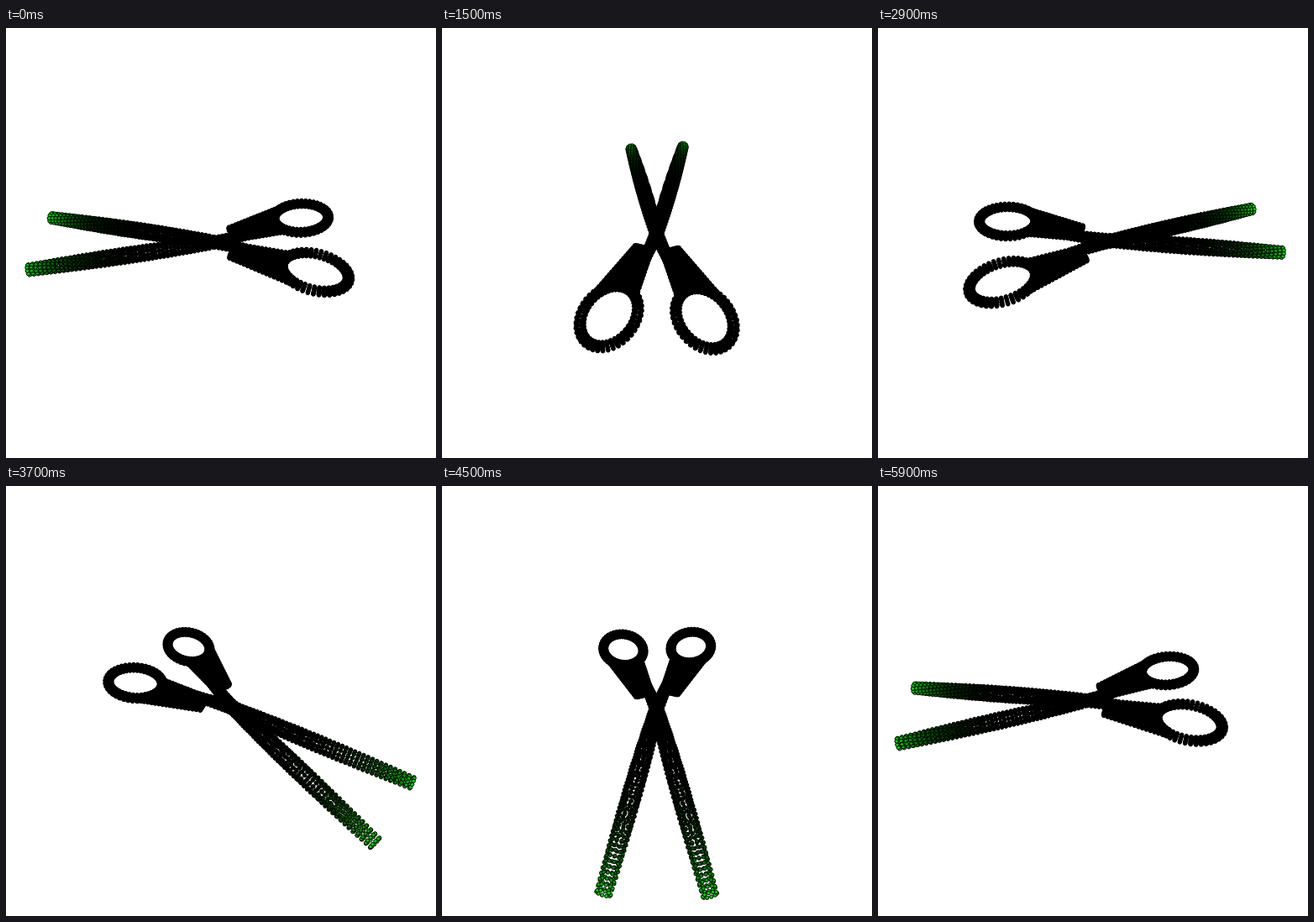
An HTML page with a canvas for the animation above (6000 ms loop, 512x512 px).

```html
<!DOCTYPE html>
<html lang="en">
<head>
<meta charset="utf-8">
<title>Turning scissors</title>
<style>
  html, body { margin: 0; width: 100%; height: 100%; overflow: hidden; background: #fff; }
  canvas { display: block; width: 512px; height: 512px; }
</style>
</head>
<body>
<canvas id="stage" width="512" height="512"></canvas>
<script>
const ctx = document.getElementById('stage').getContext('2d');
const TAU = Math.PI * 2;
const STEPS = 60, STEP_MS = 100;
const CENTER = { x: 256, y: 255 }, CAMERA = 439, TILT = Math.SQRT1_2;
const DOT = 2.2, OUTLINE = 1, TIP = 214;
const points = [];

const mix = (a, b, t) => a + (b - a) * t;
const radians = deg => deg * Math.PI / 180;

// Places twisted rings of dots around a path of [along, across] positions.
function tube(path, count, radius, side, closed = false) {
  const spokes = 10;
  for (let i = 0; i < count; i++) {
    const t = i / (closed ? count : count - 1);
    const [x, y] = path(t);
    const [x0, y0] = path(t - 0.001);
    const [x1, y1] = path(t + 0.001);
    const len = Math.hypot(x1 - x0, y1 - y0);
    const nx = -(y1 - y0) / len, ny = (x1 - x0) / len;
    const r = radius(t);
    for (let k = 0; k < spokes; k++) {
      const a = k / spokes * TAU + i * 2.4;
      const out = r * Math.cos(a);
      const shade = Math.min(1, Math.max(0, x / TIP)) ** 6;
      points.push({
        x: x + nx * out,
        y: (y + ny * out) * side,
        z: r * Math.sin(a) - 2 * side,
        color: `rgb(0,${Math.round(210 * shade)},0)`
      });
    }
  }
}

function half(side) {
  // Blade, bending outwards behind the crossing
  const blade = t => {
    const x = mix(TIP, -25, t);
    return [x, (14 - x) * (x > 14 ? 0.2075 : 0.32)];
  };
  tube(blade, 55, t => mix(5.8, 4.6, t) + 2.9 * Math.sin(Math.PI * t), side);

  // Oval grip, leaning outwards
  const c = Math.cos(radians(18)), s = Math.sin(radians(18));
  const oval = a => {
    const u = 36 * Math.cos(a), v = 27 * Math.sin(a);
    return [-103 - u * c + v * s, 47 + u * s + v * c];
  };
  tube(t => oval(t * TAU), 42, () => 4.1, side, true);

  // Shank, spread from the pivot to the near end of the oval
  const lines = 9;
  for (let i = 0; i < lines; i++) {
    const k = i / (lines - 1);
    const w = mix(-7, 7, k);
    const from = [-13.5 + w * s, 16.5 + w * c];
    const to = oval(Math.PI - radians(mix(-30, 52, k)));
    const count = Math.round(Math.hypot(to[0] - from[0], to[1] - from[1]) / 4.5) + 1;
    tube(t => [mix(from[0], to[0], t), mix(from[1], to[1], t)], count, () => 4, side);
  }
}

half(1);
half(-1);

function project(p, cos, sin) {
  const u = -p.x * cos + p.y * sin;
  const v = p.x * sin + p.y * cos;
  const depth = CAMERA + (v - p.z) * TILT;
  const scale = CAMERA / depth;
  return {
    x: CENTER.x + u * scale,
    y: CENTER.y - (v + p.z) * TILT * scale,
    depth,
    color: p.color
  };
}

function draw(step) {
  const angle = step / STEPS * TAU;
  const cos = Math.cos(angle), sin = Math.sin(angle);
  ctx.fillStyle = '#fff';
  ctx.fillRect(0, 0, 512, 512);
  ctx.strokeStyle = '#000';
  ctx.lineWidth = OUTLINE;
  const dots = points.map(p => project(p, cos, sin)).sort((a, b) => b.depth - a.depth);
  for (const d of dots) {
    ctx.fillStyle = d.color;
    ctx.beginPath();
    ctx.arc(d.x, d.y, DOT, 0, TAU);
    ctx.fill();
    ctx.stroke();
  }
}

const start = performance.now();
let shown = -1;
function tick() {
  const step = Math.floor((performance.now() - start) / STEP_MS) % STEPS;
  if (step !== shown) draw(shown = step);
  requestAnimationFrame(tick);
}
tick();
</script>
</body>
</html>
```
